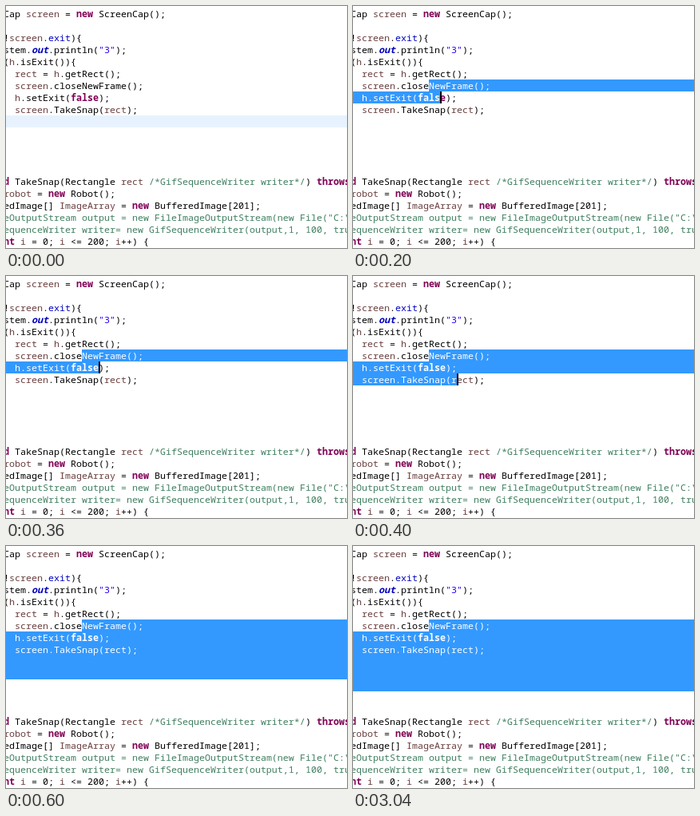
These frames come from a looping animation (427 px wide and 303 px high, 4600 ms). An HTML page with a canvas:

```html
<!DOCTYPE html>
<html lang="en">
<head>
<meta charset="utf-8">
<title>Code selection</title>
<style>
html, body { margin: 0; width: 100%; height: 100%; overflow: hidden; background: #fff; }
canvas { display: block; width: 427px; height: 303px; }
</style>
</head>
<body>
<canvas id="stage"></canvas>
<script>
const W = 427, H = 303, LOOP = 4600;
const CHAR = 7, ROW = 15, LEFT = -3, TOP = 2, BASELINE = 12;
const FONT = '11.667px "Noto Sans Mono", "DejaVu Sans Mono", monospace';
const BLUE = '#3399ff', CARET_LINE = '#e8f2fe';

// [row, column, text, whole line is a comment]
const lines = [
  [0, 0, 'Cap screen = new ScreenCap();'],
  [2, 0, '!screen.exit){'],
  [3, 0, 'stem.out.println("3");'],
  [4, 0, '(h.isExit()){'],
  [5, 2, 'rect = h.getRect();'],
  [6, 2, 'screen.closeNewFrame();'],
  [7, 2, 'h.setExit(false);'],
  [8, 2, 'screen.TakeSnap(rect);'],
  [14, 0, 'd TakeSnap(Rectangle rect /*GifSequenceWriter writer*/) throws '],
  [15, 0, 'robot = new Robot();'],
  [16, 0, 'edImage[] ImageArray = new BufferedImage[201];'],
  [17, 0, 'eOutputStream output = new FileImageOutputStream(new File("C:\\', true],
  [18, 0, 'equenceWriter writer= new GifSequenceWriter(output,1, 100, true', true],
  [19, 0, 'nt i = 0; i <= 200; i++) {']
];

const styles = {
  comment: ['#3f7f5f', ''],
  string: ['#2a00ff', ''],
  keyword: ['#7f0055', '600 '],
  constant: ['#0000c0', 'italic 600 '],
  field: ['#0000c0', ''],
  local: ['#6a3e3e', ''],
  plain: ['#000', '']
};
const syntax = new RegExp([
  '(?<comment>/\\*.*?\\*/)',
  '(?<string>"[^"]*")',
  '(?<keyword>\\b(?:new|false|throws|d|nt)\\b)',
  '(?<constant>\\bout\\b)',
  '(?<field>\\bexit\\b)',
  '(?<local>\\b(?:screen|rect|robot|ImageArray|h|i)\\b)',
  '(?<plain>\\w+|[^\\w\\s])'
].join('|'), 'g');

const tokens = lines.flatMap(([row, col, text, isComment]) =>
  [...text.matchAll(isComment ? /(?<comment>\S+)/g : syntax)].map(match => {
    const kind = Object.keys(match.groups).find(name => match.groups[name]);
    const [color, weight] = styles[kind];
    return { text: match[0], x: columnX(col + match.index), y: rowY(row) + BASELINE, color, weight };
  }));

// The selection runs from its anchor to the caret; a caret at x = 0 is out of view.
const anchor = { row: 6, x: columnX(14) };
const steps = [
  { at: 0 },
  { at: 200, row: 7, x: columnX(16) },
  { at: 300, row: 7, x: columnX(17) },
  { at: 400, row: 8, x: columnX(19) },
  { at: 500, row: 10, x: columnX(2) },
  { at: 600, row: 11, x: 0 },
  { at: 700, row: 12, x: 0 }
];

const canvas = document.getElementById('stage');
const ctx = canvas.getContext('2d');
const ratio = window.devicePixelRatio || 1;
canvas.width = Math.round(W * ratio);
canvas.height = Math.round(H * ratio);
ctx.scale(ratio, ratio);

function columnX(col) { return LEFT + col * CHAR; }
function rowY(row) { return TOP + row * ROW; }

function fill(color, x, y, w, h) {
  ctx.fillStyle = color;
  ctx.fillRect(x, y, w, h);
}

function drawText(color) {
  for (const token of tokens) {
    ctx.font = token.weight + FONT;
    ctx.fillStyle = color || token.color;
    ctx.fillText(token.text, token.x, token.y);
  }
}

function drawSelection({ row, x }) {
  const next = anchor.row + 1;
  ctx.save();
  ctx.beginPath();
  ctx.rect(anchor.x, rowY(anchor.row), W - anchor.x, ROW);
  ctx.rect(0, rowY(next), W, (row - next) * ROW);
  ctx.rect(0, rowY(row), x, ROW);
  ctx.clip();
  fill(BLUE, 0, 0, W, H);
  drawText('#fff');
  ctx.restore();
  if (x) fill('#000', x, rowY(row), 2, ROW);
}

function draw(time) {
  const step = steps.findLast(({ at }) => time >= at);
  fill('#fff', 0, 0, W, H);
  if (!step.row) fill(CARET_LINE, 0, rowY(9), W, ROW);
  drawText();
  if (step.row) drawSelection(step);
}

const start = performance.now();
function tick(now) {
  draw(Math.max(0, now - start) % LOOP);
  requestAnimationFrame(tick);
}
draw(0);
requestAnimationFrame(tick);
</script>
</body>
</html>
```
